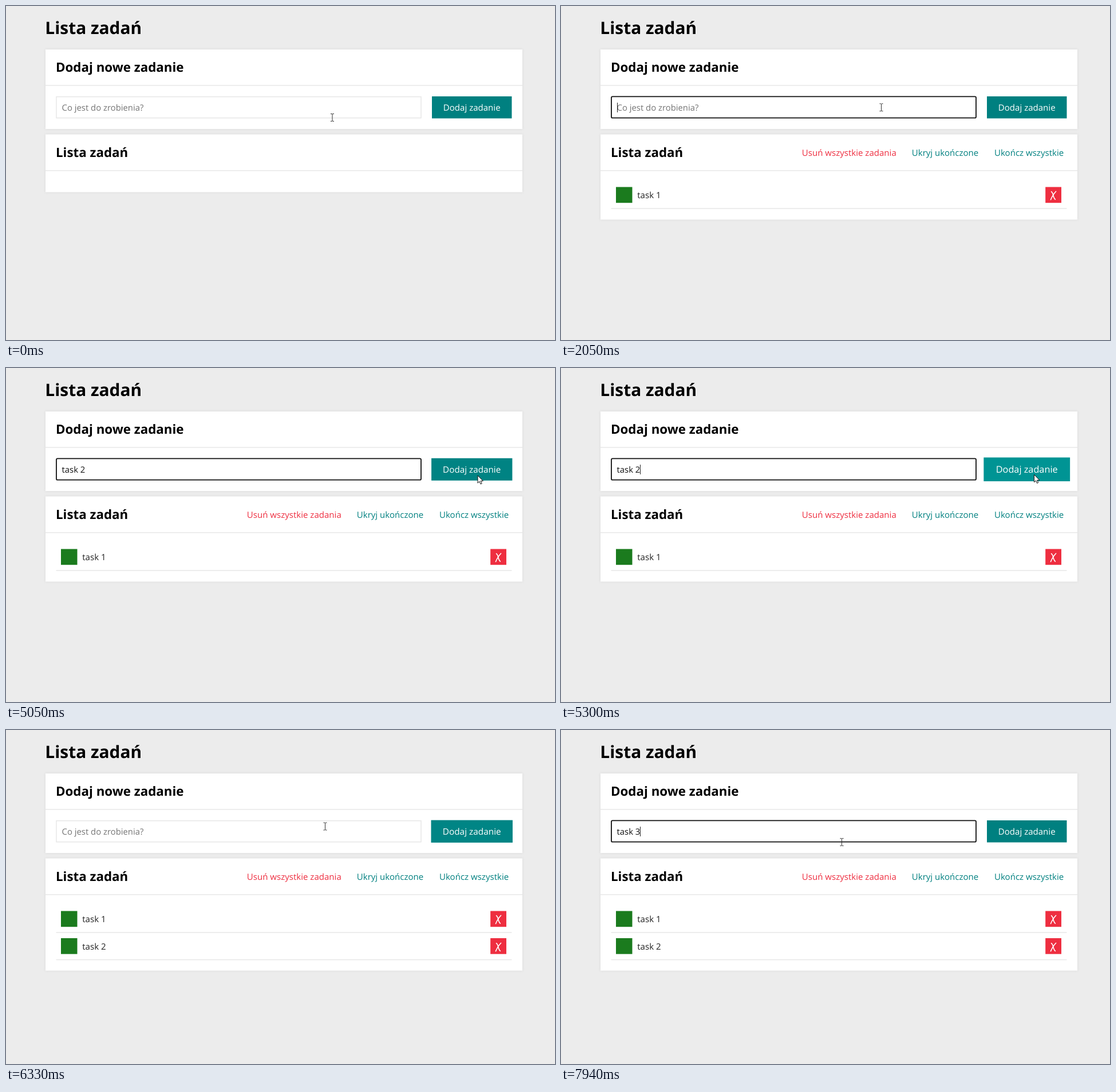
Animation of 959 by 584 pixels, one loop 7990 ms. Source, as an HTML page:

```html
<!DOCTYPE html>
<html lang="pl">
<head>
<meta charset="utf-8">
<title>Lista zadań</title>
<style>
  html, body { margin: 0; width: 100%; height: 100%; overflow: hidden; background: #ececec; }
  svg { display: block; width: 959px; height: 584px; }
  text {
    font: 15.05px "Open Sans", "Noto Sans", sans-serif;
    text-rendering: geometricPrecision;
    white-space: pre;
  }
  .h1 { font-size: 29.9px; font-weight: 700; }
  .h2 { font-size: 22.35px; font-weight: 700; }
  .field { font-size: 14.85px; }
  .card { fill: #fff; filter: drop-shadow(0 0 2px #d8d8d8); }
  .line { fill: #e9e9e9; }
  .teal { fill: #008080; }
  .red { fill: #ee2e40; }
</style>
</head>
<body>
<svg viewBox="0 0 959 584">
  <rect width="959" height="584" fill="#ececec"/>
  <text class="h1" x="68.3" y="49.4">Lista zadań</text>

  <rect class="card" x="69" y="76" width="833" height="139"/>
  <rect class="line" x="69" y="138" width="833" height="1.6"/>
  <text class="h2" x="87" y="115.2">Dodaj nowe zadanie</text>
  <rect id="box" fill="#fff"/>
  <text id="hint" class="field" x="97.6" y="183" fill="#757575">Co jest do zrobienia?</text>
  <text id="typed" class="field" x="97.6" y="183" fill="#111"></text>
  <rect id="caret" y="169" width="1" height="17" fill="#222"/>
  <g id="button">
    <rect id="face" x="744" y="158" width="139.5" height="38.5"/>
    <text x="813.7" y="183" fill="#fff" text-anchor="middle">Dodaj zadanie</text>
  </g>

  <rect id="list" class="card" x="69" y="224.5" width="833"/>
  <rect class="line" x="69" y="287" width="833" height="1.6"/>
  <text class="h2" x="87" y="264.2">Lista zadań</text>
  <g id="links">
    <text class="red" x="420.8" y="262">Usuń wszystkie zadania</text>
    <text class="teal" x="612.8" y="262">Ukryj ukończone</text>
    <text class="teal" x="757" y="262">Ukończ wszystkie</text>
  </g>
  <g id="rows"></g>

  <path id="beam" d="M-3-6.5h2.3l.7.7.7-.7H3M0-6V6M-3 6.5h2.3l.7-.7.7.7H3"
        fill="none" stroke="#333" stroke-width="1"/>
  <path id="arrow" d="M0 0V13.2L3 10.4 5 15 7.2 14 5.2 9.6H9.4Z"
        fill="#fff" stroke="#111" stroke-width="1" stroke-linejoin="round"/>
</svg>
<script>
const LOOP = 7990, BLINK = 530;
const $ = id => document.getElementById(id);

// [time, text in the field]
const typing = [
  [0, ""], [640, "t"], [800, "ta"], [1000, "tas"], [1380, "task"], [1530, "task "],
  [1690, "task 1"], [2050, ""], [3020, "t"], [3190, "ta"], [3330, "tas"], [3550, "task"],
  [4150, "task "], [4230, "task 2"], [5600, ""], [6860, "t"], [7000, "ta"], [7180, "tas"],
  [7450, "task"], [7700, "task "], [7940, "task 3"]
];
// [time, x, y] of the pointer's hot spot
const path = [
  [50, 570, 195], [330, 560.5, 180], [470, 560.5, 180], [640, 559.5, 177.3],
  [4560, 559.5, 177.3], [4640, 610, 190], [4720, 710, 198], [4800, 790, 199],
  [4880, 818, 198], [5000, 823, 194], [5050, 824, 188], [5500, 828.5, 185.3],
  [5960, 828.5, 185.3], [6050, 800, 155], [6150, 735, 140], [6280, 600, 160],
  [6400, 500, 180], [6550, 473.5, 184], [6860, 473.5, 184], [7030, 483.5, 188.5],
  [7180, 483.5, 188.5], [7300, 484, 189.5], [7450, 484, 189.5], [7720, 490.5, 196]
];
const focusSpans = [[280, 5450], [6400, LOOP]];
const hover = { on: 5000, off: 6040, time: 500 };
const added = [2050, 5600];

$("rows").innerHTML = added.map((_, i) => `
  <g transform="translate(0 ${i * 47.5})">
    <rect x="96" y="316.5" width="28.5" height="27.7" fill="#1b7b1e"/>
    <text x="133.3" y="336" fill="#222">task ${i + 1}</text>
    <rect class="red" x="846.2" y="316.5" width="27.8" height="27.7"/>
    <path d="M865 323.8Q859 330 855.2 339.2M856 324.3Q858.5 325.5 859.8 331T863.8 338.6"
          transform="translate(0 ${i * .7})" fill="none" stroke="#fff" stroke-width="1.6"/>
    <rect class="line" x="87.5" y="353.3" width="796" height="1.6"/>
  </g>`).join("");
const rows = [...$("rows").children];

const clamp = x => Math.min(1, Math.max(0, x));
const ease = x => { const u = clamp(x) ** .65; return u * u * (3 - 2 * u); };
const show = (el, on) => el.setAttribute("visibility", on ? "visible" : "hidden");
const set = (el, attrs) => { for (const k in attrs) el.setAttribute(k, attrs[k]); };

function pointer(t) {
  const i = path.findIndex(p => p[0] > t);
  if (i < 0) return path.at(-1).slice(1);
  if (i === 0) return path[0].slice(1);
  const [a, b] = [path[i - 1], path[i]];
  const k = (t - a[0]) / (b[0] - a[0]);
  return [a[1] + (b[1] - a[1]) * k, a[2] + (b[2] - a[2]) * k];
}

function drawField(t) {
  const [, text] = typing.findLast(s => s[0] <= t);
  const span = focusSpans.find(([a, b]) => t >= a && t < b);
  set($("box"), span
    ? { x: 88, y: 158.3, width: 637, height: 37.4, rx: 2, stroke: "#101010", "stroke-width": 1.8 }
    : { x: 88, y: 158.7, width: 637, height: 37, rx: 0, stroke: "#e7e7e7", "stroke-width": 1.5 });
  show($("hint"), !text);
  $("typed").textContent = text;
  if (span) {
    // Blinking restarts at each key that puts in a character.
    const key = typing.findLast(s => s[0] <= t && s[1]);
    const since = Math.max(span[0], key ? key[0] : 0);
    show($("caret"), Math.floor((t - since) / BLINK) % 2 === 0);
    const width = text ? $("typed").getComputedTextLength() : 0;
    $("caret").setAttribute("x", Math.round(97.6 + width));
  } else show($("caret"), false);
}

function drawButton(t) {
  const p = ease((t - hover.on) / hover.time) - ease((t - hover.off) / hover.time);
  const tone = Math.round(128 + 25 * p);
  $("face").setAttribute("fill", `rgb(0,${tone},${tone})`);
  $("button").setAttribute("transform",
    `translate(813.75 177.25) scale(${1 + .1 * p}) translate(-813.75 -177.25)`);
}

function drawList(t) {
  const count = added.filter(a => a <= t).length;
  rows.forEach((row, i) => show(row, i < count));
  show($("links"), count > 0);
  $("list").setAttribute("height", 100.5 + count * 48 + (count > 1 ? -.3 : .5));
}

function drawPointer(t) {
  const [x, y] = pointer(t);
  const inField = x > 87 && x < 726 && y > 158 && y < 197;
  show($("beam"), inField);
  show($("arrow"), !inField);
  $(inField ? "beam" : "arrow").setAttribute("transform", `translate(${x} ${y})`);
}

function render(t) {
  drawField(t);
  drawButton(t);
  drawList(t);
  drawPointer(t);
}

const start = performance.now();
function tick() {
  render((performance.now() - start) % LOOP);
  requestAnimationFrame(tick);
}
tick();
</script>
</body>
</html>
```
